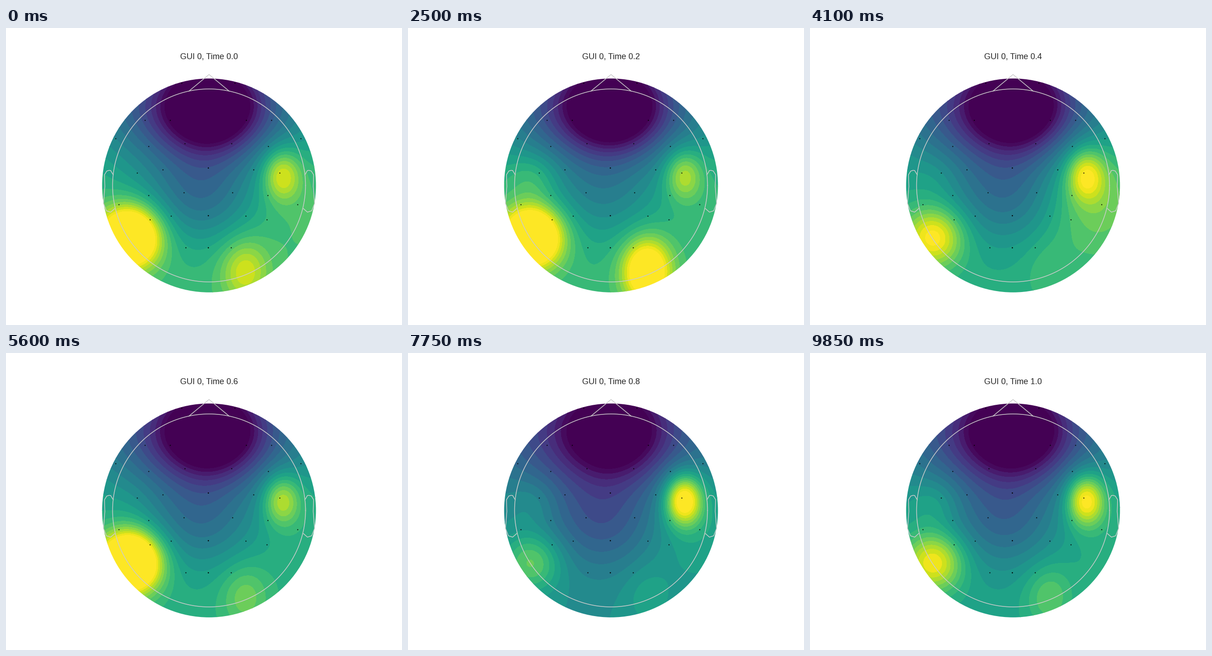
Write a matplotlib script that moves like this. It is 864 px wide and 648 px high and loops after 10000 ms.

```python
import matplotlib.pyplot as plt
import numpy as np
from matplotlib.animation import FuncAnimation
from matplotlib.patches import Circle

W, H, DPI = 864, 648, 108
CX, CY = 443, 343.5
R_MAP, R_HEAD = 233.3, 210.5
STEP, LOOP = 50, 10000
TICKS = np.r_[0, np.ceil(np.linspace(200, 9850, 69) / STEP) * STEP]

# Strength of each source at a few moments; linear in between.
KEYS = [0, 1000, 2500, 4100, 5600, 7750, 9850]
REST = [.68, .47, .67, .62, .63, .50, .58]
MIDLINE = [.40, .16, .27, .36, .36, .42, .38]
HILLS = {  # x, y, width, height
    (270, 456, 45, 45): [.85, 1.30, .85, .42, 1.00, .28, .44],
    (602, 321, 28, 38): [.34, .27, .30, .36, .34, .60, .50],
    (521, 530, 36, 48): [.27, .15, .60, .05, .16, .08, .17],
    (620, 370, 75, 95): [.05, -.06, .01, .20, .02, .11, .06],
    (272, 325, 38, 38): [.00, .08, .12, .04, .02, .08, .10],
}

gx, gy = (np.linspace(c - 236, c + 236, 160) for c in (CX, CY))
X, Y = np.meshgrid(gx, gy)


def bump(x, y, sx, sy):
    return np.exp(-((X - x) / sx) ** 2 / 2 - ((Y - y) / sy) ** 2 / 2)


frontal = .81 * bump(425, 170, 165, 95) + .88 * bump(445, 170, 65, 60)
midline = bump(425, 370, 90, 75)
hills = [(bump(*place), power) for place, power in HILLS.items()]


def field(ms):
    def now(power):
        return np.interp(ms, KEYS, power)

    ground = now(REST) * (1 - frontal - now(MIDLINE) * midline)
    return ground + sum(now(power) * shape for shape, power in hills)


fig = plt.figure(figsize=(W / DPI, H / DPI), dpi=DPI, facecolor="white")
ax = fig.add_axes([0, 0, 1, 1])
ax.set_axis_off()

disc = Circle((CX, CY), R_MAP, fill=False, lw=0)
ax.add_patch(disc)


def outline(x, y):
    ax.plot(CX + R_HEAD * np.asarray(x), CY - R_HEAD * np.asarray(y),
            color="#cccccc", lw=1, zorder=3)


turn = np.linspace(0, 2 * np.pi, 201)
outline(np.cos(turn), np.sin(turn))
nx, ny = np.sin(np.radians(12)), np.cos(np.radians(12))
outline([-nx, 0, nx], [ny, 1.15, ny])
ear_x = 2 * np.array([.497, .510, .518, .5299, .5419,
                      .54, .547, .532, .51, .489])
ear_y = 2 * np.array([.0555, .0775, .0783, .0746, .0555,
                      -.0055, -.0932, -.1313, -.1384, -.1199])
for side in (-1, 1):
    outline(side * ear_x, ear_y)

# Electrode rows: height and distances from the midline, mirrored.
ROWS = {120: [58], 201: [83, 138], 241: [202], 252: [51], 257.5: [130.5],
        304.5: [0], 308.5: [99], 316: [155.5], 359: [53], 365: [130],
        385: [195], 408.5: [0], 410: [81.5], 417.5: [127.5], 479: [0, 49.5]}
for y, spans in ROWS.items():
    for span in spans:
        ax.plot([441 - span, 441 + span], [y, y], "o", ms=1.5,
                color="black", mew=0, zorder=4)

title = ax.text(CX, 68, "", fontsize=12, family="Liberation Sans",
                color="#262626", ha="center", va="baseline")

levels = np.linspace(0, 1, 21)
bands = []


def draw(i):
    ms = TICKS[TICKS <= i * STEP][-1]
    while bands:
        bands.pop().remove()
    filled = ax.contourf(gx, gy, field(ms), levels, cmap="viridis",
                         vmin=0, vmax=1, extend="both", zorder=1)
    filled.set_clip_path(disc)
    bands.append(filled)
    ax.set(xlim=(0, W), ylim=(H, 0))
    title.set_text(f"GUI 0, Time {ms / LOOP:.1f}")
    return filled, title


anim = FuncAnimation(fig, draw, frames=LOOP // STEP, interval=STEP,
                     init_func=lambda: draw(0), repeat=True, repeat_delay=0)
plt.show()
```
